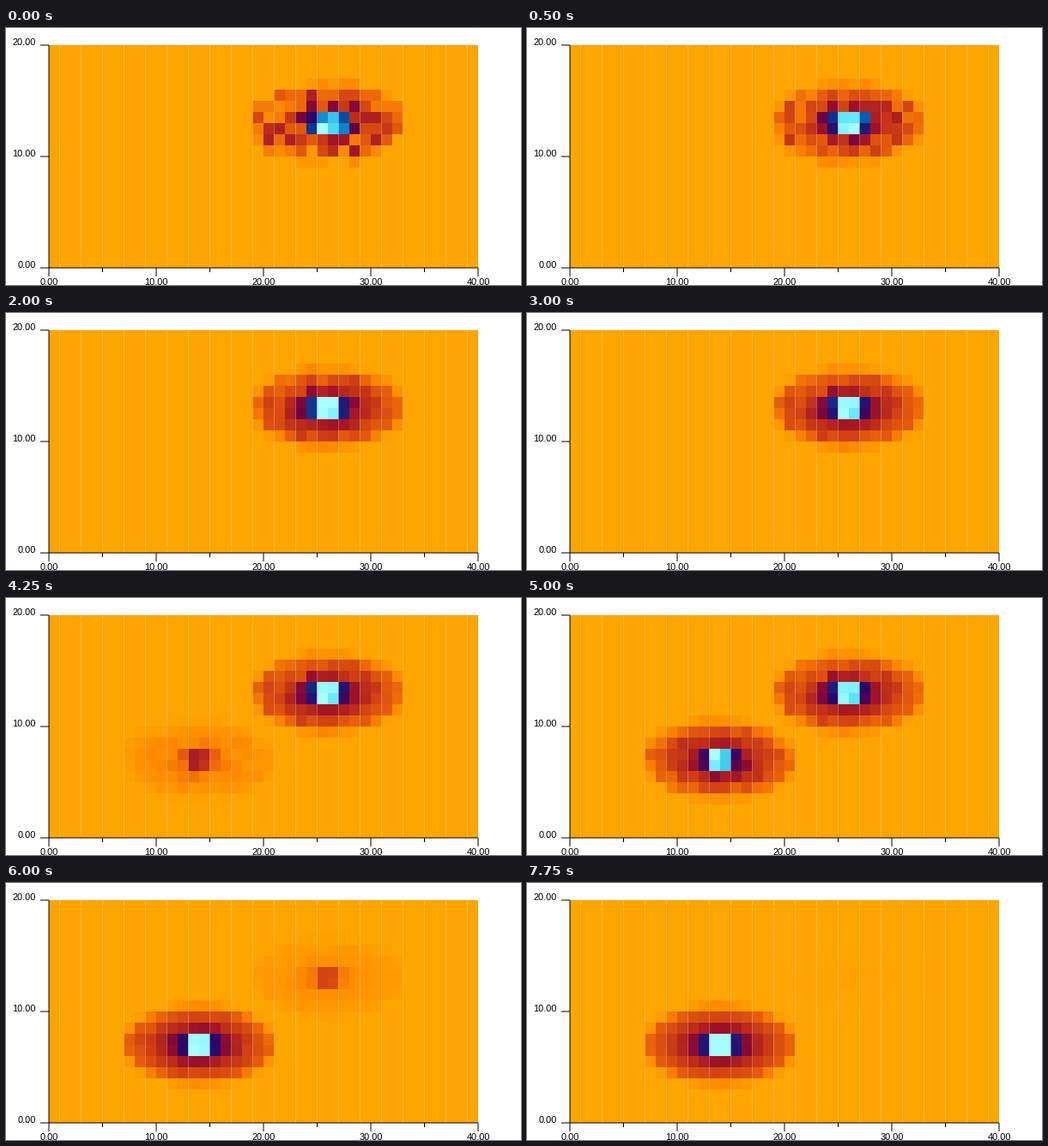
These frames come from a looping animation (600 px wide and 300 px high, 8 s). A matplotlib script:

```python
import matplotlib.pyplot as plt
import numpy as np
from matplotlib.animation import FuncAnimation
from matplotlib.colors import to_rgb
from matplotlib.patches import Rectangle

W, H, DPI = 600, 300, 100
LEFT, TOP, RIGHT, BOTTOM = 50, 20, 550, 280
COLS, ROWS = 40, 20
FRAMES, STEP_MS = 32, 250
PX = 72 / DPI

RX, RY = 7, 3.4            # half axes of the sampled ellipse, in bins
BATCH, BATCHES = 36, 13    # hits per batch in the fullest bin, batches of peak 1
START, EVEN = 15, 20       # frames where peak 2 appears and draws level
GROWTH = 10 ** 0.2

STOPS = [(0, "#ffa500"), (.06, "#ff8800"), (.12, "#e9610a"), (.19, "#c83815"),
         (.275, "#a01326"), (.37, "#6c0044"), (.46, "#2c0669"),
         (.54, "#0050a8"), (.6, "#0070c0"), (.88, "#50e0f5"), (1, "#a8ffff")]
LEVELS = [s for s, _ in STOPS]
TINTS = np.array([to_rgb(c) for _, c in STOPS])


def density(cx, cy, fine=40):
    """Share per bin of points with uniform radius and angle, centre bin = 1."""
    x = (np.arange(COLS * fine) + .5) / fine - cx
    y = (np.arange(ROWS * fine) + .5) / fine - cy
    r = np.hypot(x[None, :] / RX, y[:, None] / RY)
    d = np.where(r < 1, 1 / r, 0)
    d = d.reshape(ROWS, fine, COLS, fine).mean(axis=(1, 3))
    return d / d.max()


def fill(rng, cx, cy, size):
    """Counts per frame while the fullest bin grows to the given sizes."""
    added = np.diff(size, prepend=0)[:, None, None]
    return rng.poisson(density(cx, cy) * added).cumsum(axis=0)


rng = np.random.default_rng(5)
frame = np.arange(FRAMES)
size_1 = BATCH * np.minimum(frame + 1, BATCHES)
size_2 = np.where(frame < START, 0,
                  .95 * BATCH * BATCHES * GROWTH ** (frame - EVEN))
COUNTS = fill(rng, 26, 13, size_1) + fill(rng, 14, 7, size_2)


def picture(i):
    h = COUNTS[i] / COUNTS[i].max()
    rgb = np.stack([np.interp(h, LEVELS, TINTS[:, c]) for c in range(3)], axis=-1)
    a, b = rgb[:, 0::2], rgb[:, 1::2]
    seam = .25 + .25 * a + .5 * b        # half-covered pixel between two bins
    pair = np.stack([a] * 12 + [seam] + [b] * 12, axis=2)
    wide = pair.reshape(ROWS, RIGHT - LEFT, 3)
    return np.uint8(np.round(255 * np.repeat(wide, 13, axis=0)))


fig = plt.figure(figsize=(W / DPI, H / DPI), dpi=DPI, facecolor="white")
heat = fig.figimage(picture(0), xo=LEFT, yo=H - BOTTOM, origin="lower")
ax = fig.add_axes([0, 0, 1, 1], zorder=2)
ax.set_xlim(0, W)
ax.set_ylim(H, 0)
ax.axis("off")


def line(x0, y0, x1, y1):
    """One pixel wide line centred on the pixel edge."""
    dx, dy = (.5, 0) if x0 == x1 else (0, .5)
    ax.add_patch(Rectangle((x0 - dx, y0 - dy), x1 - x0 + 2 * dx, y1 - y0 + 2 * dy,
                           facecolor="black", linewidth=0, snap=False))


def label(x, y, value, align):
    ax.text(x, y, f"{value:.2f}", ha=align, va="baseline", color="black",
            family="Liberation Sans", size=11 * PX)


line(LEFT, TOP, LEFT, BOTTOM)
line(LEFT, BOTTOM, RIGHT, BOTTOM)
for v in range(0, COLS + 1, 5):
    x = LEFT + v * 12.5
    major = v % 10 == 0
    line(x, BOTTOM, x, BOTTOM + (10 if major else 5))
    if major:
        label(x, 300, v, "center")
for v in range(0, ROWS + 1, 10):
    y = BOTTOM - v * 13
    line(LEFT - 10, y, LEFT, y)
    label(35, y, v, "right")


def draw(i):
    heat.set_data(picture(i))
    return (heat,)


anim = FuncAnimation(fig, draw, frames=FRAMES, interval=STEP_MS,
                     repeat=True, repeat_delay=0, blit=False)
plt.show()
```
